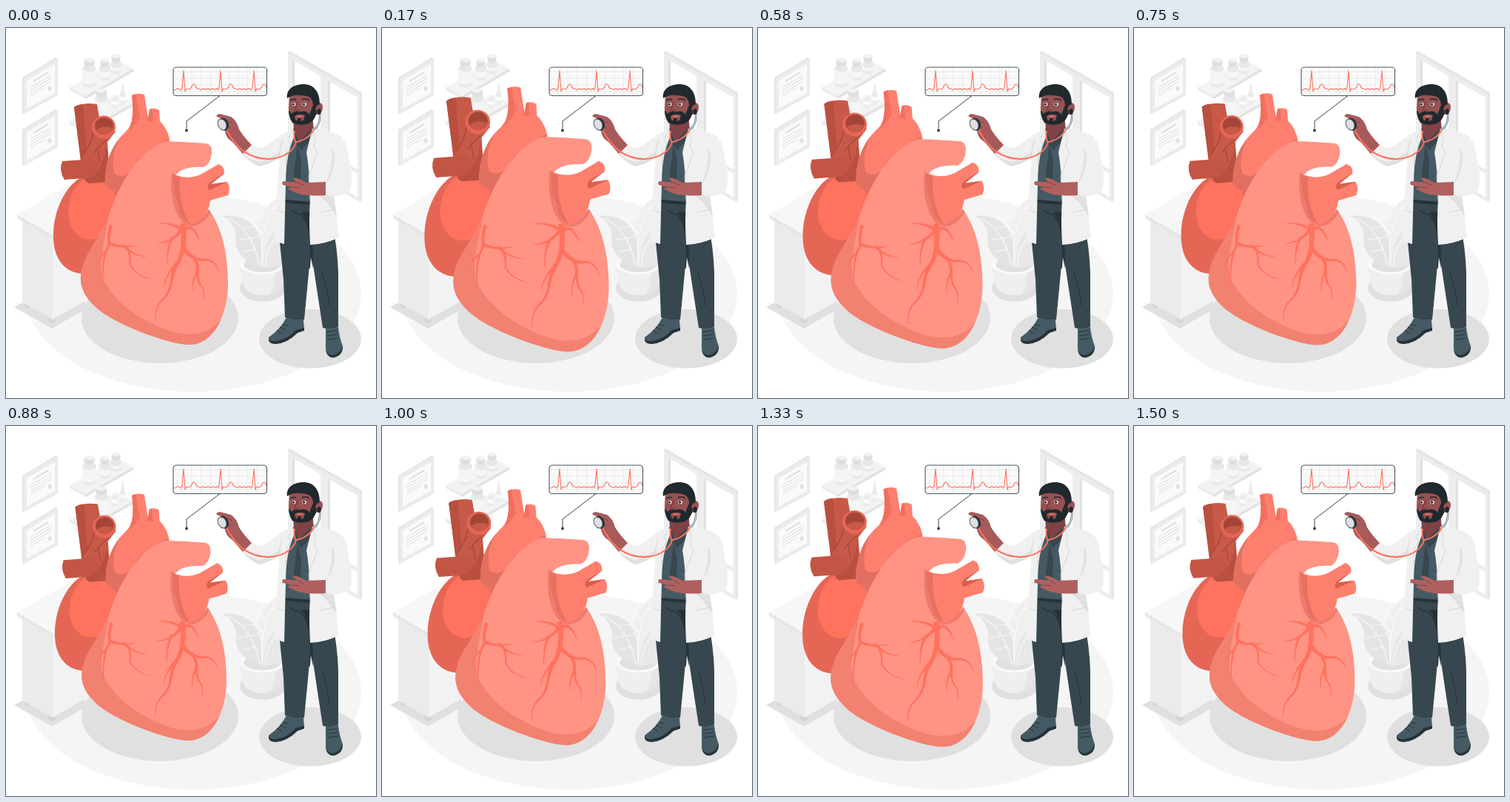
An HTML page that plays this animation: 500 px wide and 500 px high, repeating every 1.54 s.

```html
<!DOCTYPE html>
<html lang="en">
<head>
<meta charset="utf-8">
<title>Heart check</title>
<style>
  html, body { margin: 0; width: 100%; height: 100%; overflow: hidden; background: #fff; }
  svg { display: block; width: 100vw; height: 100vh; }
</style>
</head>
<body>
<svg viewBox="0 0 500 500" xmlns="http://www.w3.org/2000/svg">
  <defs>
    <clipPath id="bodyClip"><use href="#body"/></clipPath>
    <clipPath id="archClip"><use href="#arch"/></clipPath>
    <clipPath id="panelClip"><rect x="226" y="53" width="126.500" height="38.500" rx="4"/></clipPath>
  </defs>

  <!-- floor and shadows -->
  <ellipse cx="253" cy="359" rx="227" ry="132.500" fill="#f5f5f5"/>
  <g fill="#e0e0e0">
    <ellipse cx="208" cy="392" rx="106" ry="61"/>
    <ellipse cx="411" cy="420" rx="69" ry="40"/>
    <ellipse cx="347" cy="351" rx="31" ry="19"/>
    <path d="M11 377L22 371L62 392L107 368V380L62 406Z"/>
  </g>

  <!-- certificates -->
  <g id="cert">
    <path d="M22 67L67 40L70 41V91L24 116L22 115Z" fill="#e6e6e6"/>
    <path d="M24 68L70 41V91L24 116Z" fill="#ebebeb"/>
    <path d="M28 71L66 48.500V88L28 109Z" fill="#fafafa"/>
    <g stroke="#d9d9d9" fill="none">
      <path d="M37 72L57 60" stroke-width="1.800"/>
      <path d="M33 80L61 64M33 84L61 68M33 88L61 72M33 92L53 80.500" stroke-width=".9"/>
    </g>
    <ellipse cx="59" cy="82" rx="2.500" ry="3" fill="#e0e0e0"/>
  </g>
  <use href="#cert" y="70"/>

  <!-- shelves -->
  <g id="shelf">
    <path d="M86 80L150 43L172 55L108 92Z" fill="#f3f3f3"/>
    <path d="M86 80L108 92V96L86 84Z" fill="#ebebeb"/>
    <path d="M108 92L172 55V59L108 96Z" fill="#e2e2e2"/>
  </g>
  <use href="#shelf" y="46"/>
  <g id="bottles"></g>
  <g fill="#ebebeb">
    <path d="M143 95Q147 91 151 95V107Q147 110 143 107Z"/>
    <path d="M154 90L156 84L157 74H158.500L159.500 84L162 90V101Q158 104 154 101Z"/>
    <path d="M143 98Q147 101 151 98V103Q147 106 143 103ZM154 92Q158 95 162 92V97Q158 100 154 97Z" fill="#fafafa"/>
  </g>

  <!-- window -->
  <path d="M381 32L384 31L481 87V233L478 235L381 179Z" fill="#e6e6e6"/>
  <path d="M381 34L478 90V235L381 179Z" fill="#ededed"/>
  <path d="M387 43L425 65V138L387 116ZM387 122L425 144V198L387 176ZM435 71L475 94V191L435 168ZM435 174L475 197V228L435 205Z" fill="#fff"/>
  <path d="M387 43L390 45V118L387 116ZM435 71L438 73V170L435 168ZM435 174L438 176V207L435 205Z" fill="#e0e0e0"/>

  <!-- cabinet -->
  <path d="M22 257L63 281V394L22 370Z" fill="#ebebeb"/>
  <path d="M63 281L150 231V344L63 394Z" fill="#f2f2f2"/>
  <path d="M15 252L102 202L150 230L63 280Z" fill="#f7f7f7"/>
  <path d="M15 252L63 280V285L15 257Z" fill="#e6e6e6"/>
  <path d="M63 280L150 230V235L63 285Z" fill="#ededed"/>
  <path d="M25 372L31 375.500V380L25 377ZM57 391L63 394L67 392V396L62 399L57 396Z" fill="#d6d6d6"/>

  <!-- plant -->
  <path d="M316 319C316 345 322 361 346 361C371 361 377 345 377 319Z" fill="#efefef"/>
  <path d="M352 361C371 358 377 345 377 319H364C366 340 362 355 352 361Z" fill="#e6e6e6"/>
  <ellipse cx="346.500" cy="319" rx="30.500" ry="14" fill="#fafafa"/>
  <ellipse cx="346.500" cy="319.500" rx="25" ry="10.500" fill="#e0e0e0"/>
  <path d="M343 323C333 290 336 250 367 229L380 236V318L350 324Z" fill="#f0f0f0"/>
  <path d="M347 324C349 295 356 275 380 262V318Z" fill="#e8e8e8"/>
  <path d="M341 323C322 316 307 300 311 284C311 270 303 260 293 254C318 251 338 264 342 283C347 297 345 312 346 323Z" fill="#e4e4e4"/>
  <g fill="none" stroke="#fafafa" stroke-width="1.200">
    <path d="M300 257C323 268 337 290 343 322M346 321C344 285 350 252 368 236M350 321C353 300 361 283 373 275"/>
    <path d="M321 270L337 268M330 284L343 281M330 284L312 287M337 298L321 303M346 278L338 270M350 261L343 256"/>
  </g>

  <!-- monitor -->
  <rect x="226" y="53" width="126.500" height="38.500" rx="4" fill="#fafafa"/>
  <g clip-path="url(#panelClip)" fill="none">
    <path id="grid" stroke="#e6e6e6" stroke-width=".8"/>
    <path id="pulse" stroke="#ff725e" stroke-width="1.100" stroke-linejoin="round"/>
  </g>
  <rect x="226" y="53" width="126.500" height="38.500" rx="4" fill="none" stroke="#455a64" stroke-width="1.100"/>
  <path d="M289 91.500L244 126V138" fill="none" stroke="#37474f"/>
  <circle cx="244" cy="138.500" r="2" fill="#37474f"/>

  <!-- heart -->
  <g id="heart">
    <path d="M108 199C84 207 65 242 64 278C63 311 79 331 104 332L140 330L160 235L140 200Z" fill="#e56655"/>
    <path d="M113 201C95 206 84 229 84 249C84 271 98 286 114 286C135 285 153 262 154 243C152 225 136 201 113 201Z" fill="#ff725e"/>

    <path d="M92 107Q106 100 123 103L126 120L148 140L137 154L141 208H107L100 168Z" fill="#c75948"/>
    <path d="M92 107Q97 103 104 103L109 166L101 180Z" fill="#b9503f"/>
    <path d="M118 128C120 145 113 159 106 169M136 152C128 156 125 162 119 169M127 182L124 164" fill="none" stroke="#a34638" stroke-width="1.200"/>
    <path d="M76 180L117 177Q125 179 124 192Q118 203 106 203L79 205Q71 192 76 180Z" fill="#c35544"/>
    <path d="M124 192Q118 203 106 203L111 210L140 208L136 160Q133 180 124 192Z" fill="#b9503f"/>
    <ellipse cx="132" cy="134" rx="16" ry="15.500" fill="#e56655"/>
    <ellipse cx="132.500" cy="132.500" rx="12.500" ry="11.500" fill="#a34638"/>
    <path d="M122 138Q128 131 144 135Q141 144 132 144Q125 143 122 138Z" fill="#c75948"/>

    <path id="arch" d="M170 91Q178 87 187 90L192 122L194 110Q200 107 207 111L208 126Q220 138 222 156L160 232L134 212C133 184 142 158 162 140Q175 128 170 91Z" fill="#ff7f6e"/>
    <g clip-path="url(#archClip)">
      <path d="M167 128C149 150 140 177 147 197C158 205 172 190 178 178L218 150L224 160L155 240L128 216V160L160 130Z" fill="#e27061"/>
      <path d="M168 133C149 153 141 177 147 195C156 206 169 196 174 184C180 170 194 158 215 152V130L190 122Z" fill="#ff7f6e"/>
      <path d="M168 89L175 89L181 121L166 141Q174 122 168 89ZM192 108L197 108L199 126L191 126Z" fill="#f06f5f"/>
    </g>

    <path id="body" d="M101 337C103 304 128 287 140 250C156 204 181 165 216 153Q244 154 271 156Q279 158 278 170Q276 184 267 188C251 187 237 190 231 197Q223 205 228 222C232 247 240 262 251 262C263 262 269 253 274 245C291 269 300 302 300 347C299 390 280 428 247 428C218 427 143 399 120 376Q100 357 101 337Z" fill="#ff9384"/>
    <g clip-path="url(#bodyClip)">
      <path d="M140 245C134 291 120 324 135 346C153 378 190 398 220 409C255 420 285 413 302 375V435H90V320Z" fill="#f28170"/>
      <path d="M224 195C220 226 229 264 249 268C264 268 273 257 277 246L260 235Z" fill="#ed7b6c"/>
    </g>
    <path d="M226 197Q244 206 263 198L287 184Q296 187 295 197L277 211L299 208Q304 217 300 226L276 233Q272 261 248 266Q237 261 233 242Q224 216 226 197Z" fill="#ff7f6e"/>
    <path d="M226 197Q230 201 235 202C233 224 238 248 249 265Q237 261 233 242Q224 216 226 197Z" fill="#e87060"/>
    <path d="M295 196L277 211L299 208L275 219Q270 216 275 209Z" fill="#d9604f"/>
    <g id="veins" fill="#ff725e">
      <path data-w="4" d="M142 266Q137 284 140 293Q129 306 131 350"/>
      <path data-w="4" d="M138 290Q152 298 176 294"/>
      <path data-w="3" d="M158 293Q170 307 190 309"/>
      <path data-w="2.5" d="M163 296Q170 310 167 319Q176 335 195 339"/>
      <path data-w="2" d="M134 303Q124 312 122 322"/>
      <path data-w="7" d="M239 264Q244 300 230 321C220 338 228 350 212 367Q201 376 202 396"/>
      <path data-w="4" d="M240 274Q226 263 206 264"/>
      <path data-w="4" d="M238 272Q225 290 204 291"/>
      <path data-w="3" d="M226 282Q217 296 218 320"/>
      <path data-w="4" d="M241 273Q252 263 262 288"/>
      <path data-w="5" d="M240 298Q254 316 270 313Q283 314 288 330"/>
      <path data-w="4" d="M252 308Q263 322 256 334Q252 342 253 356"/>
      <path data-w="3" d="M259 324Q258 344 265 350Q268 356 267 368"/>
      <path data-w="3" d="M232 316Q214 336 214 350"/>
    </g>
  </g>

  <!-- legs -->
  <path d="M378 230L412 232L442 270Q448 300 449 330L449 404Q438 409 428 405L412 300L403 394Q390 397 377 391L375 340L370 290Z" fill="#37474f"/>
  <path d="M384 246Q396 254 410 250M398 251Q411 263 412 300L410 325" fill="none" stroke="#263238" stroke-width="1.500"/>
  <path d="M400 248Q410 265 411 305L415 325L413 249Z" fill="#263238"/>
  <path d="M427 330Q435 355 437 376" fill="none" stroke="#263238"/>
  <g fill="#455a64">
    <path d="M379 391Q391 396 402 394L403 408L393 411Q380 425 365 426Q354 426 355 418Q371 407 379 391Z"/>
    <path d="M432 405Q441 408 449 404Q450 416 455 430Q454 443 442 445Q433 445 432 433Z"/>
  </g>
  <path d="M355 419Q356 424 366 423Q380 421 392 408L403 405V409L394 412Q380 426 365 427Q354 427 355 419ZM432 434Q434 443 443 442Q453 439 455 429Q456 443 442 445.500Q433 445 432 434Z" fill="#263238"/>
  <path d="M374 400L382 403M370 404L378 408M366 408L373 413M434 411L447 409M434 416L448 414M434 421L449 419" stroke="#263238" fill="none"/>

  <!-- shirt and neck -->
  <path d="M384 139L394 132L414 136L416 238L376 236V155Z" fill="#455a64"/>
  <path d="M388 125L414 117L416 139L397 156L389 139Z" fill="#7f4345"/>
  <path d="M390 136L395 154L413 137L414 149L399 165L392 156L387 148Z" fill="#37474f"/>
  <path d="M394 158L399 180L398 209L388 205Z" fill="#37474f"/>
  <path d="M377 232L413 235V239L377 236Z" fill="#263238"/>

  <!-- coat -->
  <path d="M388 136C374 140 361 154 346 162L329 158Q321 162 319 170Q332 184 343 187Q357 184 370 174Q367 204 365 240L363 288L376 292L378 210Q378 170 390 146Z" fill="#f0f0f0"/>
  <path d="M414 136Q430 137 445 142Q459 149 461 164L467 198Q468 216 462 224L443 228Q447 256 450 283Q432 292 411 293Q409 260 411 230Q410 190 406 168Z" fill="#f0f0f0"/>
  <path d="M320 170Q333 180 344 181Q359 176 371 166L370 174Q357 184 343 187Q332 184 319 170ZM441 165Q446 187 431 209V226L443 228L447 255Q437 237 425 228L433 207Q441 190 441 165Z" fill="#e0e0e0"/>
  <path d="M388 137L381 150L385 157L379 165L378 188M414 138Q420 149 416 160L421 168L409 200L411 232M374 152Q369 162 370 176M441 164Q448 183 434 207M367 246L377 250M425 249L444 245" fill="none" stroke="#d6d6d6"/>

  <!-- hands -->
  <path d="M320 170L332 158Q321 147 315 137Q312 125 304 120L289 116Q283 117 285 120L299 125L289 124Q286 126 289 129L296 132L290 134L296 139Q297 149 306 154Z" fill="#a85a5b"/>
  <path d="M299 125L306 128M296 132L304 135M295 138L302 140" fill="none" stroke="#7f4345"/>
  <path d="M432 208L406 209Q396 203 388 202Q388 206 395 209L375 207Q372 209 374 212L386 215L380 217L390 222Q404 228 432 226Z" fill="#b0605f"/>
  <path d="M386 215L396 216M395 209L402 213" fill="none" stroke="#7f4345"/>

  <!-- stethoscope -->
  <path d="M298 137C307 156 324 177 355 177C379 176 390 163 392 154C401 153 412 146 416 137M392 155Q388 148 390 139" fill="none" stroke="#ff725e" stroke-width="2"/>
  <path id="tube" d="M416 137Q425 132 424 114" fill="none" stroke="#455a64" stroke-width="2.400"/>
  <path d="M416 137Q425 132 424 114" fill="none" stroke="#e0e0e0" stroke-width="1.200"/>
  <g transform="rotate(-24 293 130)">
    <ellipse cx="294" cy="130.500" rx="6.500" ry="8.800" fill="#263238"/>
    <ellipse cx="292" cy="130" rx="5.500" ry="7.800" fill="#e0e0e0" stroke="#455a64"/>
  </g>

  <!-- head -->
  <path d="M383 91Q401 84 420 91L421 102Q428 99 428 108Q427 117 419 117L414 126Q404 133 390 127Q382 120 382 108Z" fill="#985152"/>
  <g fill="#20292e">
    <path d="M380 95C378 83 389 76 402 76C416 76 424 86 424 103L420 105L417 111L414 99Q412 91 398 91Q387 90 380 95Z"/>
    <path d="M382 111L386 116Q390 111 397 113Q407 111 410 117L415 104L420 113Q417 126 409 129Q397 133 387 128Q382 121 382 111Z"/>
  </g>
  <path d="M390 119Q396 115 404 118L402 125Q396 127 391 124Z" fill="#985152"/>
  <path d="M391 119Q396 117 403 119Q397 122 391 119Z" fill="#d66c66"/>
  <path d="M394 122H399L398 128H394Z" fill="#20292e"/>
  <path d="M394 100Q393 106 390 110Q393 112 397 110" fill="none" stroke="#703b3d" stroke-width="1.100"/>
  <path d="M384 98Q388 95 392 97M400 97Q405 94 410 98" fill="none" stroke="#20292e" stroke-width="1.500"/>
  <ellipse cx="389" cy="103" rx="2.500" ry="2.200" fill="#eee"/>
  <ellipse cx="403" cy="103" rx="2.900" ry="2.300" fill="#eee"/>
  <g fill="#20292e">
    <circle cx="388.500" cy="103" r="1.600"/>
    <circle cx="402.500" cy="103" r="1.700"/>
    <ellipse cx="423" cy="113" rx="2.700" ry="4"/>
  </g>
</svg>

<script>
const el = id => document.getElementById(id);

// Monitor grid and trace
let grid = '';
for (let x = 238.5; x < 352; x += 12.6) grid += `M${x} 53V92`;
for (let y = 59; y < 92; y += 9) grid += `M226 ${y}H353`;
el('grid').setAttribute('d', grid);

const spike = x => `L${x - 3.5} 84L${x - 2} 80L${x} 58L${x + 2} 86L${x + 3.5} 82L${x + 7} 83
  Q${x + 10} 82 ${x + 12} 77Q${x + 14} 74 ${x + 16} 78Q${x + 17} 82 ${x + 20} 82`;
function ripple(from, to) {
  let d = '';
  for (let x = from, i = 0; x < to; x += 3, i++) d += `L${x} ${i % 2 ? 81.5 : 83.5}`;
  return d;
}
el('pulse').setAttribute('d', 'M226 84' + ripple(229, 235) + spike(240) + ripple(264, 286) +
  spike(290) + ripple(313, 331) + spike(335));

// Medicine bottle: centre, cap top, bottom, half width
function bottle(x, top, bottom, r) {
  const cap = r * 0.78, neck = top + 9;
  return `<path d="M${x - r} ${neck + 3}Q${x} ${neck - 5} ${x + r} ${neck + 3}V${bottom - 3}Q${x} ${bottom + 3} ${x - r} ${bottom - 3}Z" fill="#e8e8e8"/>
    <path d="M${x - r} ${neck + 7}q${r} 5 ${2 * r} 0V${bottom - 6}q${-r} 5 ${-2 * r} 0Z" fill="#f5f5f5"/>
    <path d="M${x - cap} ${top + 2}V${neck}q${cap} 5 ${2 * cap} 0V${top + 2}Z" fill="#dedede"/>
    <ellipse cx="${x}" cy="${top + 2.5}" rx="${cap}" ry="3" fill="#f2f2f2"/>`;
}
el('bottles').innerHTML = bottle(148.5, 35.5, 62, 7.5) + bottle(133.5, 41, 71, 7.5) +
  bottle(112.5, 40.5, 80, 9) + bottle(129, 82, 124, 9);

// Turn a centre line into a strand that thins towards its end
function taper(path) {
  const len = path.getTotalLength(), steps = 24, left = [], right = [];
  for (let i = 0; i <= steps; i++) {
    const at = len * i / steps;
    const p = path.getPointAtLength(at);
    const a = path.getPointAtLength(Math.max(0, at - 0.5));
    const b = path.getPointAtLength(Math.min(len, at + 0.5));
    const dx = b.x - a.x, dy = b.y - a.y;
    const k = (path.dataset.w * (1 - i / steps) + 0.7) / 2 / Math.hypot(dx, dy);
    left.push(`${p.x - dy * k} ${p.y + dx * k}`);
    right.unshift(`${p.x + dy * k} ${p.y - dx * k}`);
  }
  path.setAttribute('d', 'M' + left.concat(right).join('L') + 'Z');
}
document.querySelectorAll('#veins path').forEach(taper);

// Two beats per loop, linear between keys
const LOOP = 1540, LEAD = 55, BASE = 1.018;
const keys = [[0, 1], [300, 1.1], [940, 1], [1240, 1.1], [1540, 1]];

function beat(ms) {
  const t = (ms + LEAD) % LOOP;
  const i = keys.findIndex(k => k[0] > t);
  const [t0, s0] = keys[i - 1], [t1, s1] = keys[i];
  return s0 + (s1 - s0) * (t - t0) / (t1 - t0);
}

function draw(ms) {
  const s = beat(ms) / BASE;
  el('heart').setAttribute('transform', `translate(182 258) scale(${s}) translate(-182 -258)`);
}

let start;
function tick(now) {
  if (start === undefined) start = now;
  draw(now - start);
  requestAnimationFrame(tick);
}
draw(0);
requestAnimationFrame(tick);
</script>
</body>
</html>
```
